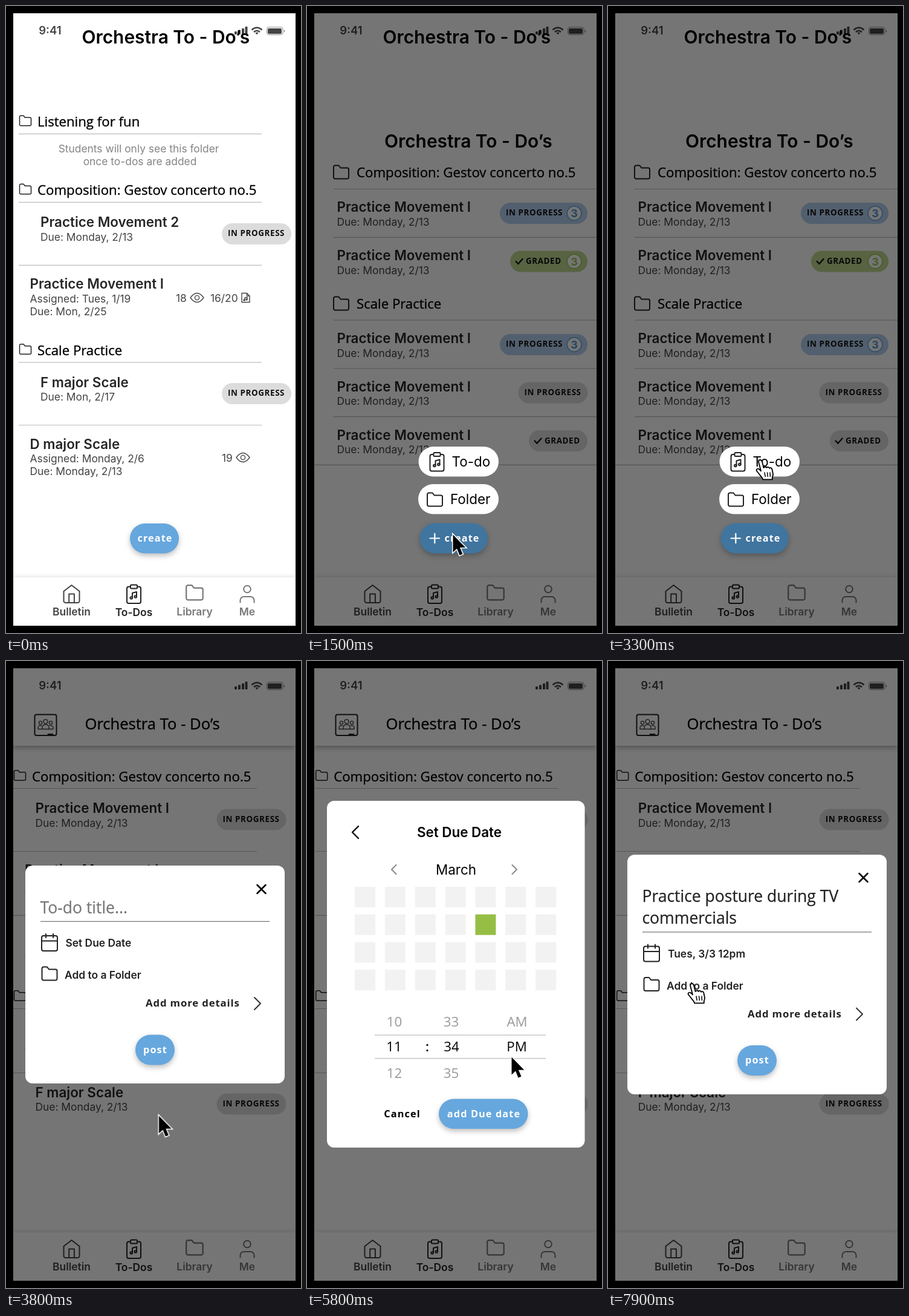
An HTML page that plays this animation: 488x1036 px, repeating every 8 s.

```html
<!DOCTYPE html>
<html lang="en">
<head>
<meta charset="utf-8">
<title>Orchestra to-dos</title>
<style>
html, body { margin: 0; width: 100%; height: 100%; overflow: hidden; background: #000; }
svg { display: block; width: 488px; height: 1036px; }
text { font: 17.4px Inter, sans-serif; fill: #444; white-space: pre; }
.title { font-size: 29.9px; font-weight: 600; fill: #000; }
.head { font-size: 22.4px; font-weight: 600; fill: #262626; }
.plain { font-size: 22.4px; fill: #000; }
.semi { font-weight: 600; fill: #222; }
.hum { font: 22.2px "Open Sans", sans-serif; fill: #000; }
.name { stroke: #000; stroke-width: .35px; }
.bold { font: 700 16.3px "Open Sans", sans-serif; letter-spacing: 1.1px; fill: #222; }
.more { font-size: 16.8px; letter-spacing: .85px; }
.tag { font: 700 13.4px "Open Sans", sans-serif; letter-spacing: .6px; fill: #111; }
.input { font-size: 26.5px; fill: #222; stroke: #222; stroke-width: .25px; }
.hint { fill: #777; stroke: #777; }
.mid { text-anchor: middle; }
.white { fill: #fff; }
.pale { fill: #999; }
.soft { fill: #858585; }
.num { font-weight: 700; font-size: 18px; text-anchor: middle; }
.icon { fill: none; stroke: #222; stroke-width: 2; stroke-linecap: round; stroke-linejoin: round; }
.icon path, .icon rect, .icon circle { vector-effect: non-scaling-stroke; }
.thin { stroke-width: 1.4; stroke: #444; }
.grey { stroke: #777; }
.rule { stroke: #bdbdbd; stroke-width: 1.2; fill: none; }
.drop { filter: drop-shadow(0 4px 4px rgba(0, 0, 0, .25)); }

.show { animation: 8s step-end infinite; }
.list { animation-name: list; }
.menu { animation-name: menu; }
.top { animation-name: top; }
.page { animation-name: page; }
.dim { animation-name: dim; }
.form { animation-name: form; }
.date { animation-name: date; }
.done { animation-name: done; }
.late { animation: nudge 8s step-end infinite; }
.arrow { animation-name: arrow; }
.hand { animation-name: hand; }
.cursor { animation: move 8s ease-in-out infinite; }

@keyframes list { 0% { visibility: visible } 18.7%, to { visibility: hidden } }
@keyframes menu { 0% { visibility: hidden } 18.7% { visibility: visible } 43.7%, to { visibility: hidden } }
@keyframes top { 0% { visibility: visible } 43.7%, to { visibility: hidden } }
@keyframes page { 0% { visibility: hidden } 43.7%, to { visibility: visible } }
@keyframes dim { 0% { visibility: hidden } 18.7%, to { visibility: visible } }
@keyframes form { 0% { visibility: hidden } 43.7% { visibility: visible } 64.95%, to { visibility: hidden } }
@keyframes date { 0% { visibility: hidden } 64.95% { visibility: visible } 87.45%, to { visibility: hidden } }
@keyframes done { 0% { visibility: hidden } 87.45%, to { visibility: visible } }
@keyframes nudge { 0% { transform: none } 64.95%, to { transform: translateX(1.2px) } }
@keyframes arrow {
  0% { visibility: hidden } 7.45% { visibility: visible } 36.5% { visibility: hidden }
  43.7% { visibility: visible } 79% { visibility: hidden }
  87.45% { visibility: visible } 96%, to { visibility: hidden }
}
@keyframes hand {
  0% { visibility: hidden } 36.5% { visibility: visible } 43.7% { visibility: hidden }
  79% { visibility: visible } 87.45% { visibility: hidden } 96%, to { visibility: visible }
}
@keyframes move {
  0%, 7.5% { transform: translate(430px, 874px) }
  17.5%, 27.5% { transform: translate(240px, 872px) }
  38.75%, 47% { transform: translate(252px, 752px) }
  56.25%, 60% { transform: translate(148px, 406px) }
  61.25% { transform: translate(157px, 402px) }
  64%, 65% { transform: translate(152px, 462px) }
  69%, 71.25% { transform: translate(294px, 428px) }
  72.5%, 73% { transform: translate(337px, 653px) }
  81.25%, 90.6% { transform: translate(313px, 745px) }
  97.5%, to { transform: translate(139px, 535px) }
}
</style>
</head>
<body>
<svg viewBox="0 0 488 1036">
<defs>
  <path id="folder" d="M2 4a2.5 2.5 0 0 1 2.5-2.5h6l3 4h11a2.5 2.5 0 0 1 2.5 2.5v13a2.5 2.5 0 0 1-2.5 2.5h-20a2.5 2.5 0 0 1-2.5-2.5z"/>
  <g id="clip">
    <rect x="1.5" y="4" width="23" height="27.5" rx="3"/>
    <rect x="7.5" y="1" width="11" height="6" rx="1.5" fill="#fff"/>
    <path d="M10.5 22.5v-8l7-2v8"/>
    <circle cx="8.8" cy="22.5" r="1.8"/><circle cx="15.8" cy="20.5" r="1.8"/>
  </g>
  <g id="eye"><path d="M0 8Q11-7 22 8Q11 23 0 8z"/><circle cx="11" cy="8" r="3.6"/></g>
  <g id="gray">
    <rect width="115" height="35" rx="17.5" fill="#dcdcdc"/>
    <text class="tag" x="10" y="21">IN PROGRESS</text>
  </g>
  <g id="blue">
    <rect width="145" height="35" rx="17.5" fill="#b4d0f0"/>
    <text class="tag" x="10" y="21">IN PROGRESS</text>
    <circle cx="123" cy="17.5" r="11.8" fill="#fff" stroke="#5fa3dc" stroke-width="1.5"/>
    <text class="num" x="123" y="24" style="fill:#4a97d8">3</text>
  </g>
  <path id="tick" d="M0 5l4 4 7-8" fill="none" stroke="#111" stroke-width="2.4" stroke-linecap="round"/>
  <g id="row">
    <text class="head">Practice Movement I</text>
    <text y="22.5">Due: Monday, 2/13</text>
  </g>
  <path id="cross" d="M-7-7L7 7M7-7L-7 7" stroke="#000" stroke-width="2.5" stroke-linecap="round"/>
  <g id="fields">
    <path d="M57 430.3H436" stroke="#777" stroke-width="1.3"/>
    <g class="icon">
      <rect x="59" y="454" width="26" height="25" rx="3"/>
      <path d="M59 462.5h26M66 451v6M78 451v6"/>
      <use href="#folder" x="57.5" y="504"/>
      <path d="M411 556l10 10-10 10" stroke="#333"/>
    </g>
    <text class="semi" x="97" y="525">Add to a Folder</text>
    <text class="bold more" x="231" y="571">Add more details</text>
    <rect class="drop" x="214" y="617.5" width="65" height="50" rx="25" fill="#66a7de"/>
    <text class="bold white mid" x="247" y="647.5">post</text>
  </g>
</defs>

<rect x="12" y="12" width="467" height="1012" fill="#fff"/>

<g class="show list">
  <g class="icon">
    <use href="#folder" transform="translate(21 180) scale(.76)"/>
    <use href="#folder" transform="translate(21 293) scale(.76)"/>
    <use href="#folder" transform="translate(21 557.5) scale(.76)"/>
  </g>
  <path class="rule" d="M21 211.3H423M21 324.3H423M21 428.3H423M21 588.8H423M21 692.5H423"/>
  <text class="hum name" x="52" y="199">Listening for fun</text>
  <text class="mid soft" x="219.5" y="242">Students will only see this folder</text>
  <text class="mid soft" x="221.5" y="263">once to-dos are added</text>
  <text class="hum name" x="52" y="312">Composition: Gestov concerto no.5</text>
  <text class="head" x="57" y="365">Practice Movement 2</text>
  <text x="57" y="387.5">Due: Monday, 2/13</text>
  <use href="#gray" x="357" y="359"/>
  <text class="head" x="39.5" y="467">Practice Movement I</text>
  <text x="39.5" y="489.5">Assigned: Tues, 1/19</text>
  <text x="39.5" y="511">Due: Mon, 2/25</text>
  <text x="281" y="488.5">18</text>
  <text x="338" y="488.5">16/20</text>
  <g class="icon thin">
    <use href="#eye" x="305" y="474"/>
    <path d="M390 474.5h8.5l4.5 4.5v10.5h-13zM398.5 474.5v4.5h4.5M395 486v-4l4-1v4"/>
    <circle cx="394" cy="486" r="1"/><circle cx="398" cy="485" r="1"/>
    <use href="#eye" x="381" y="738"/>
  </g>
  <text class="hum name" x="52" y="576.5">Scale Practice</text>
  <text class="head" x="57" y="629.5">F major Scale</text>
  <text x="57" y="652">Due: Mon, 2/17</text>
  <use href="#gray" x="357" y="623"/>
  <text class="head" x="39.5" y="731.5">D major Scale</text>
  <text x="39.5" y="754">Assigned: Monday, 2/6</text>
  <text x="39.5" y="775">Due: Monday, 2/13</text>
  <text x="357" y="752.5">19</text>
  <rect class="drop" x="205" y="855" width="81" height="49.5" rx="24.7" fill="#66a7de"/>
  <text class="bold white mid" x="246.5" y="885">create</text>
</g>

<g class="show menu">
  <text class="title" x="128" y="234">Orchestra To - Do’s</text>
  <g class="icon">
    <use href="#folder" x="42" y="262"/><use href="#folder" x="42" y="479"/>
  </g>
  <path class="rule" d="M44 302.5H479M44 382.3H479M44 519H479M44 599H479M44 678.7H479M12 758.3H479"/>
  <text class="hum name" x="82" y="282.5">Composition: Gestov concerto no.5</text>
  <text class="hum name" x="82" y="500">Scale Practice</text>
  <use href="#row" x="49.5" y="340"/><use href="#row" x="49.5" y="420"/>
  <use href="#row" x="49.5" y="557"/><use href="#row" x="49.5" y="636.5"/>
  <use href="#row" x="49.5" y="716.5"/>
  <use href="#blue" x="319" y="325"/><use href="#blue" x="319" y="542"/>
  <rect x="336" y="404.5" width="128" height="35" rx="17.5" fill="#c0d890"/>
  <use href="#tick" x="345.5" y="417"/>
  <text class="tag" x="362" y="426">GRADED</text>
  <circle cx="442" cy="422" r="11.8" fill="#fff" stroke="#9bc650" stroke-width="1.5"/>
  <text class="num" x="442" y="428.5" style="fill:#9bc650">3</text>
  <use href="#gray" x="349.5" y="621.5"/>
  <rect x="367" y="701" width="97" height="35" rx="17.5" fill="#dcdcdc"/>
  <use href="#tick" x="376.5" y="713.5"/>
  <text class="tag" x="393" y="722.5">GRADED</text>
</g>

<g class="show page">
  <g class="late">
    <g class="icon">
      <use href="#folder" transform="translate(12 179.5) scale(.76)"/>
      <use href="#folder" transform="translate(12 543.5) scale(.76)"/>
    </g>
    <path class="rule" d="M12 210.5H415M12 314.5H415M12 420.3H415M12 574.5H415M12 680.5H415"/>
    <text class="hum name" x="43" y="198.5">Composition: Gestov concerto no.5</text>
    <use href="#row" x="48.5" y="251"/>
    <use href="#gray" x="348.5" y="244.5"/>
    <text class="head" x="31" y="353">Practice Movement I</text>
    <text x="31" y="381">Assigned: Tues, 1/19</text>
    <text x="31" y="487">Assigned: Tues, 1/19</text>
    <text x="31" y="641">Assigned: Monday, 2/6</text>
    <text class="head" x="48.5" y="720.5">F major Scale</text>
    <text x="48.5" y="743">Due: Monday, 2/13</text>
    <use href="#gray" x="348.5" y="714.5"/>
  </g>
  <rect x="12" y="12" width="467" height="128" fill="#fff" style="filter:drop-shadow(0 3px 5px rgba(0,0,0,.32))"/>
  <g class="icon">
    <rect x="47.5" y="88.5" width="36" height="34.5" rx="3"/>
    <path d="M70 121.5h7" stroke-width="3"/>
    <g class="thin">
      <circle cx="65.5" cy="100" r="3.4"/><circle cx="57" cy="102" r="2.6"/><circle cx="74" cy="102" r="2.6"/>
      <path d="M60 112.5v-3a5.5 4.5 0 0 1 11 0v3zM59 112.5h-6v-3a4 3.5 0 0 1 6-2.5M72 112.5h6v-3a4 3.5 0 0 0-6-2.5"/>
    </g>
  </g>
  <text class="hum name" x="130.5" y="112.5" style="font-size:25.6px">Orchestra To - Do’s</text>
</g>

<text class="semi" x="54.2" y="46.7" style="font-size:18.5px;fill:#444">9:41</text>
<g fill="#444">
  <rect x="378" y="42" width="4" height="5" rx="1"/><rect x="384" y="39.5" width="4" height="7.5" rx="1"/>
  <rect x="390" y="37" width="4" height="10" rx="1"/><rect x="395.5" y="34" width="4" height="13" rx="1"/>
  <rect x="433" y="37" width="23" height="9" rx="2"/>
  <path d="M460 39.5q2 2 0 4z"/>
</g>
<rect x="431.5" y="35" width="26.500" height="12.5" rx="3.5" fill="none" stroke="#888"/>
<g fill="none" stroke="#444" stroke-width="2.6">
  <path d="M406.5 39.5q8.5-7.5 17 0M410 43q5-4.5 10 0"/>
  <path d="M412.5 44.5q2.5-2 5 0l-2.5 2.7z" fill="#444" stroke="none"/>
</g>
<text class="title show top" x="125.5" y="62">Orchestra To - Do’s</text>

<rect x="12" y="944" width="467" height="80" fill="#fff" style="filter:drop-shadow(0 -2px 3px rgba(0,0,0,.1))"/>
<g class="icon">
  <path d="M95.5 967l13-10 13 10v16a3 3 0 0 1-3 3h-20a3 3 0 0 1-3-3zM104.2 986v-14.500h8.700v14.500" stroke="#444"/>
  <use href="#clip" x="198.500" y="955.500"/>
  <g class="grey">
    <use href="#folder" transform="translate(296 955.5) scale(1.1)"/>
    <circle cx="399" cy="963.5" r="5.8"/>
    <path d="M387.500 985.500v-3.500a6 6 0 0 1 6-6h11a6 6 0 0 1 6 6v3.500"/>
  </g>
</g>
<g class="mid">
  <text class="semi" x="108.5" y="1007" style="fill:#444">Bulletin</text>
  <text class="semi" x="211.5" y="1007.5">To-Dos</text>
  <text class="semi" x="312" y="1007" style="fill:#777">Library</text>
  <text class="semi" x="399" y="1006.5" style="fill:#777">Me</text>
</g>

<rect class="show dim" x="12" y="12" width="467" height="1012" fill="#000" fill-opacity=".54"/>

<g class="show menu">
  <rect x="184.5" y="728" width="132.5" height="49.5" rx="24.7" fill="#fff"/>
  <rect x="184" y="790" width="133" height="49.5" rx="24.7" fill="#fff"/>
  <g class="icon"><use href="#clip" x="202" y="737"/><use href="#folder" x="197" y="803"/></g>
  <text class="plain" x="239.5" y="761">To-do</text>
  <text class="plain" x="237" y="823">Folder</text>
  <rect class="drop" x="186.5" y="854.5" width="112.5" height="50" rx="25" fill="#40759f"/>
  <path d="M203.5 879.5h15.5M211.3 871.8v15.5" stroke="#fff" stroke-width="2.2" stroke-linecap="round"/>
  <text class="bold white mid" x="256.5" y="885">create</text>
</g>

<g class="show form">
  <rect x="32" y="338" width="429" height="360" rx="12" fill="#fff"/>
  <use href="#fields"/>
  <use href="#cross" x="422.5" y="377"/>
  <text class="hum input hint" x="56.5" y="417">To-do title...</text>
  <text class="semi" x="98.5" y="472">Set Due Date</text>
</g>

<g class="show date">
  <rect x="33" y="231" width="426.5" height="573" rx="12" fill="#fff"/>
  <g class="icon">
    <path d="M85 273l-10 10 10 10" stroke="#000" stroke-width="2.4"/>
    <path d="M147.5 337l-7.5 7.5 7.5 7.5M339.5 337l7.5 7.5-7.5 7.5" stroke="#888"/>
  </g>
  <text class="head mid" x="252" y="291" style="fill:#000">Set Due Date</text>
  <text class="plain mid" x="246.5" y="353">March</text>
  <g id="days" fill="#f2f2f2"></g>
  <path class="rule" d="M112 618.2H395M112 656.7H395"/>
  <g class="mid">
    <text class="hum pale" x="144.5" y="604">10</text>
    <text class="hum pale" x="238.5" y="604">33</text>
    <text class="hum pale" x="347.5" y="604">AM</text>
    <text class="hum" x="144" y="645">11</text>
    <text class="hum name" x="199" y="645">:</text>
    <text class="hum" x="239" y="645">34</text>
    <text class="hum" x="347" y="645">PM</text>
    <text class="hum pale" x="144.5" y="688.5">12</text>
    <text class="hum pale" x="238.5" y="688.5">35</text>
  </g>
  <text class="bold mid" x="157.5" y="753.5" style="fill:#000">Cancel</text>
  <rect class="drop" x="218" y="723.5" width="147.5" height="49.5" rx="24.7" fill="#66a7de"/>
  <text class="bold white mid" x="292.5" y="753.5">add Due date</text>
</g>

<g class="show done">
  <rect x="32" y="320" width="429" height="396" rx="12" fill="#fff"/>
  <use href="#fields" y="17.5"/>
  <use href="#cross" x="422.5" y="358"/>
  <text class="hum input" x="56.5" y="398">Practice posture during TV</text>
  <text class="hum input" x="56.5" y="434">commercials</text>
  <text class="semi" x="99" y="489.5">Tues, 3/3 12pm</text>
</g>

<g class="cursor">
  <path class="show arrow" d="M1.5 1.5v29l6.5-6 4.5 11 5-2-4.600-10.800h9.300z" stroke="#fff" stroke-width="3" paint-order="stroke"/>
  <g class="show hand" fill="#fff" stroke="#000" stroke-width="1.8" stroke-linejoin="round" stroke-linecap="round">
    <path d="M-3 1c0-4 5-4 6 0l2.500 10c1-2 4.500-2 5 0 1-1.500 4-1.500 4.500.8 1-1.200 4-.8 4.300 1.500l1.500 7c.8 3-1 5-1 7v3H4c0-3-4-6-6-9l-4-5c-1.500-3 2-5 4.500-2.500L1 16.300z"/>
    <path d="M7 19l1.200 6.500M11.500 19l.8 6.500M16 19l.4 6.500" stroke-width="1.5"/>
  </g>
</g>
</svg>
<script>
const days = document.getElementById('days');
for (let i = 0; i < 28; i++) {
  const cell = document.createElementNS('http://www.w3.org/2000/svg', 'rect');
  const set = (k, v) => cell.setAttribute(k, v);
  set('x', 79 + i % 7 * 49.85);
  set('y', 373 + Math.floor(i / 7) * 45.7);
  set('width', 34);
  set('height', 34);
  if (i === 11) set('fill', '#96be45');
  days.append(cell);
}
</script>
</body>
</html>
```
